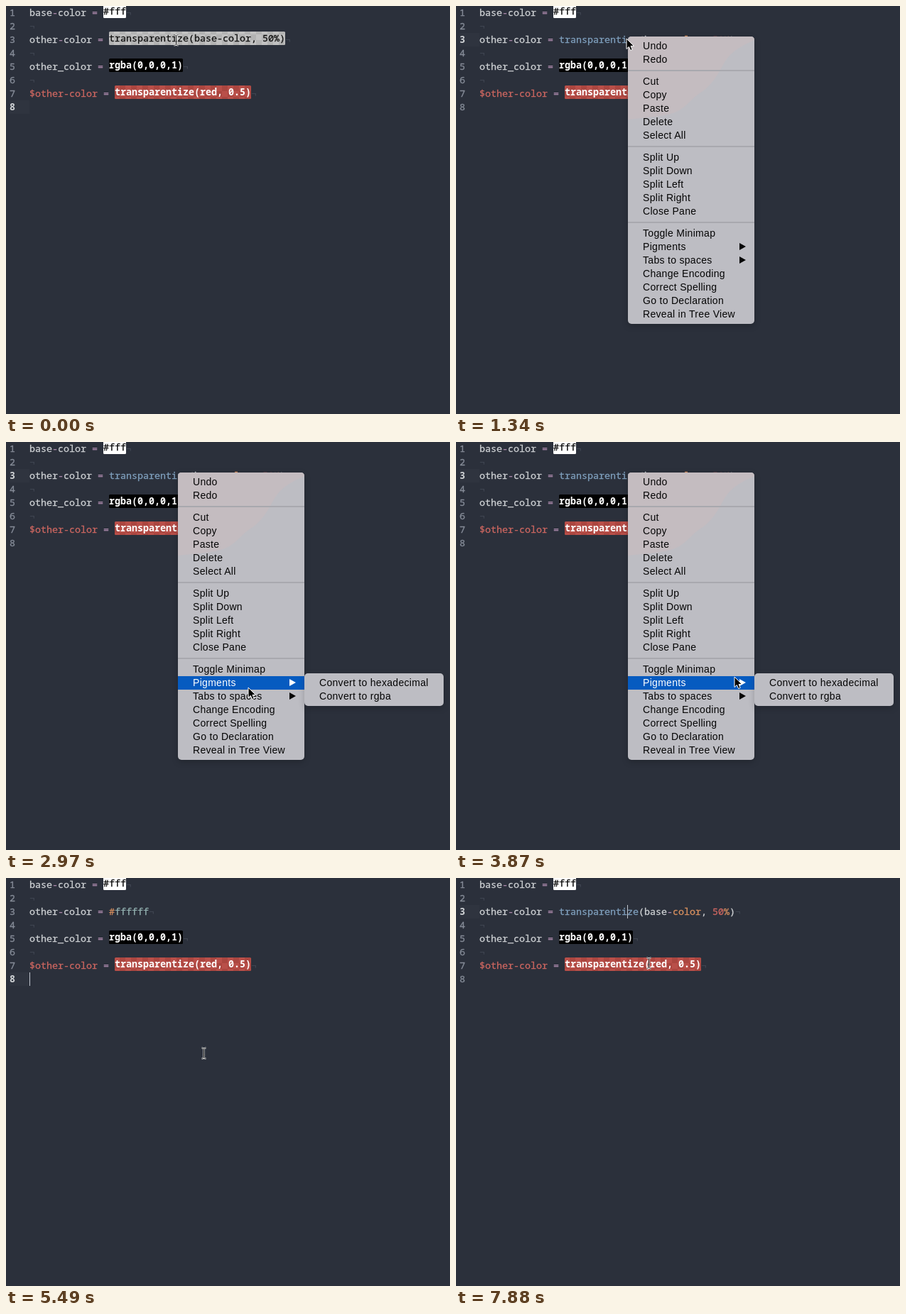
Write an HTML page that moves like this. It is 625 px wide and 575 px high and loops after 8000 ms.

```html
<!DOCTYPE html>
<html lang="en">
<head>
<meta charset="utf-8">
<title>Convert a color from the context menu</title>
<style>
  html, body { margin: 0; width: 100%; height: 100%; overflow: hidden; background: #2b303b; }
  svg { display: block; }
  text { white-space: pre; }
  .code { font: 500 13.333px "Noto Sans Mono", "DejaVu Sans Mono", monospace; stroke-width: .3px; }
  .strong { font-weight: 600; stroke-width: 0; }
  .menu { font: 14px "Liberation Sans", Arial, sans-serif; letter-spacing: .3px; stroke-width: 0; }
  .panel { filter: drop-shadow(0 3px 4px rgba(0, 0, 0, .2)); }
</style>
</head>
<body>
<svg id="stage" width="625" height="575" viewBox="0 0 625 575">
  <defs>
    <pattern id="grey" width="16" height="16" patternUnits="userSpaceOnUse">
      <path fill="#c1c1c1" d="M0 0h16v16H0z"/><path fill="#b3b3b3" d="M0 0h8v8H0zM8 8h8v8H8z"/>
    </pattern>
    <pattern id="red" width="16" height="16" patternUnits="userSpaceOnUse">
      <path fill="#b94f49" d="M0 0h16v16H0z"/><path fill="#ab4640" d="M0 0h8v8H0zM8 8h8v8H8z"/>
    </pattern>
  </defs>
  <g id="view"></g>
</svg>
<script>
const LOOP = 8000, PITCH = 19, CHAR = 8, LEFT = 33;
const C = { fg: '#cdd0d3', op: '#b08db0', dim: '#868c98', faint: '#414753', blue: '#7f9fbd',
            red: '#cb6660', orange: '#d9905f', teal: '#96b5b4' };

// Each track holds [start time, ...values]; the last entry reached applies.
const POINTER = [
  [0, 239, 48, 'beam'],
  [1340, 240, 46], [1790, 246, 62], [1940, 266, 135], [2080, 294, 222], [2230, 320, 294],
  [2370, 336, 333], [2520, 340, 343], [2970, 341, 346], [3120, 341, 352], [3270, 345, 348],
  [3420, 350, 343], [3720, 367, 336], [3870, 392, 331], [4010, 413, 333], [4160, 429, 336],
  [4310, 437, 338],
  [4900, 432, 334, 'beam'], [5040, 390, 308, 'beam'], [5190, 318, 264, 'beam'],
  [5340, 282, 249, 'beam'], [5490, 278, 247, 'beam'],
  [7740, 275, 190, 'beam'], [7880, 271, 120, 'beam']
];
const CARET = [
  [0], [150, 33, 8], [290, 241, 3], [890], [4900, 201, 3], [5340, 33, 8],
  [5940], [6390, 33, 8], [6840, 241, 3], [7440], [7880, 241, 3]
];
const ACTIVE = [[0, 8], [290, 3], [5340, 8], [6840, 3]];
const THIRD = [[0, 'marked'], [440, 'call'], [4900, 'hex'], [6390, 'hexMarked'], [6840, 'call']];

const GROUPS = [
  ['Undo', 'Redo'],
  ['Cut', 'Copy', 'Paste', 'Delete', 'Select All'],
  ['Split Up', 'Split Down', 'Split Left', 'Split Right', 'Close Pane'],
  ['Toggle Minimap', 'Pigments', 'Tabs to spaces', 'Change Encoding', 'Correct Spelling',
   'Go to Declaration', 'Reveal in Tree View']
];
const ITEMS = GROUPS.flatMap((names, g) => {
  const first = [56, 106, 213, 320][g];
  return names.map((name, i) => ({ name, y: first + i * PITCH }));
});
const SUBITEMS = [{ name: 'Convert to hexadecimal', y: 339 }, { name: 'Convert to rgba', y: 358 }];

const at = (track, t) => track.findLast(entry => entry[0] <= t);
const rowTop = row => (row - 1) * PITCH;
const rect = (x, y, w, h, fill, r = 0) =>
  `<rect x="${x}" y="${y}" width="${w}" height="${h}" rx="${r}" fill="${fill}"/>`;
const text = (x, y, s, fill, cls) =>
  `<text x="${x}" y="${y}" fill="${fill}" stroke="${fill}" class="${cls}">${s}</text>`;

// Runs are [text, color] or [text, color, marker fill].
function codeLine(row, runs) {
  let x = LEFT, out = '';
  const top = rowTop(row);
  for (const [s, fill, mark] of runs) {
    const width = s.length * CHAR;
    if (mark) out += rect(x, top - 2, width, PITCH, mark, 1.5);
    const cls = mark && fill === '#fff' ? 'code strong' : 'code';
    out += text(x, top + (mark ? 12 : 14), s, fill, cls);
    x += width;
  }
  return out + text(x, top + 14, '¬', C.faint, 'code');
}

function assign(name, joiner, fill = C.fg, joinerFill = fill) {
  const [a, b] = name.split(joiner);
  return [[a, fill], [joiner, joinerFill], [b + ' ', fill], ['= ', C.op]];
}

const VALUES = {
  marked: [['transparentize(base-color, 50%)', '#111', 'url(#grey)']],
  call: [['transparentize', C.blue], ['(base', C.fg], ['-', C.op], ['color', C.orange],
         [', ', C.fg], ['50', C.red], ['%', C.orange], [')', C.fg]],
  hex: [['#', C.orange], ['ffffff', C.teal]],
  hexMarked: [['#ffffff', '#000', '#fff']]
};

function editor(t) {
  const active = at(ACTIVE, t)[1], [, caretX, caretRow] = at(CARET, t);
  let out = rect(5, rowTop(active), 28, PITCH, '#2f343f');
  for (let n = 1; n <= 8; n++) {
    const on = n === active;
    out += text(5, rowTop(n) + 14, n, on ? C.fg : C.dim, on ? 'code strong' : 'code');
  }
  out += codeLine(1, [...assign('base-color', '-', C.fg, C.op), ['#fff', '#000', '#fff']]);
  out += codeLine(3, [...assign('other-color', '-', C.fg, C.op), ...VALUES[at(THIRD, t)[1]]]);
  out += codeLine(5, [...assign('other_color', '_'), ['rgba(0,0,0,1)', '#fff', '#000']]);
  out += codeLine(7, [...assign('$other-color', '-', C.red),
                      ['transparentize(red, 0.5)', '#fff', 'url(#red)']]);
  for (const n of [2, 4, 6]) out += codeLine(n, []);
  if (caretX) out += rect(caretX, rowTop(caretRow), 1, PITCH, '#c0c5ce');
  return out;
}

function panel(x, y, w, h, items, chosen, decor = '') {
  let out = rect(x, y, w, h, '#bdbdc3', 5) + decor;
  for (const item of items) {
    const on = item === chosen, fill = on ? '#fff' : '#050505';
    if (on) out += rect(x, item.y - 9, w, PITCH, '#065bc0');
    out += text(x + 21, item.y + 5, item.name, fill, 'menu');
    if (/Pigments|Tabs/.test(item.name))
      out += `<path fill="${fill}" d="M399 ${item.y - 5}l9 5-9 5z"/>`;
  }
  return `<g class="panel">${out}</g>`;
}

function menus(t, x, y) {
  if (t < 1340 || t >= 4900) return '';
  const fading = t >= 4750;
  const under = list => list.find(item => y >= item.y - 9 && y < item.y + 10);
  const pigments = ITEMS.find(item => item.name === 'Pigments');
  const inSub = x > 420;
  const chosen = fading || x <= 242 ? null : inSub ? pigments : under(ITEMS);
  const glow = fading ? '' : '<path fill="#c4bcc0" d="M247 43H415q5 0 5 5C401 57 386 64 376 83' +
    'S357 114 343 123 322 147 302 152 266 157 242 160V48q0-5 5-5z"/>';
  const rules = [90, 197, 304].map(top => rect(242, top, 178, 2, '#a8a8ae')).join('');
  let out = panel(242, 43, 178, 405, ITEMS, chosen, glow + rules);
  if (fading || (t >= 2520 && chosen === pigments))
    out += panel(420, 326, 196, 46, SUBITEMS, inSub && !fading ? under(SUBITEMS) : null);
  return `<g opacity="${fading ? .6 : 1}">${out}</g>`;
}

function pointer(x, y, kind) {
  if (kind === 'beam') {
    const d = 'M-3-7.5Q0-7.5 0-5V5Q0 7.5-3 7.5M3-7.5Q0-7.5 0-5V5Q0 7.5 3 7.5M-1.5 2H1.5';
    return `<g transform="translate(${x + .5} ${y})" fill="none">` +
      `<path d="${d}" stroke="#fff" stroke-width="2"/><path d="${d}" stroke="#111" stroke-width=".8"/></g>`;
  }
  return `<path transform="translate(${x} ${y})" fill="#000" stroke="#fff" ` +
    'd="M0 0V14.5L3.4 11.4 5.7 16.6 8.2 15.5 6 10.4H10.5z"/>';
}

const view = document.getElementById('view');
let shown = '';
function draw(now) {
  const t = now % LOOP;
  const [, x, y, kind] = at(POINTER, t);
  const markup = editor(t) + menus(t, x, y) + pointer(x, y, kind);
  if (markup !== shown) view.innerHTML = shown = markup;
}
const start = performance.now();
function tick() {
  draw(performance.now() - start);
  requestAnimationFrame(tick);
}
tick();
</script>
</body>
</html>
```
